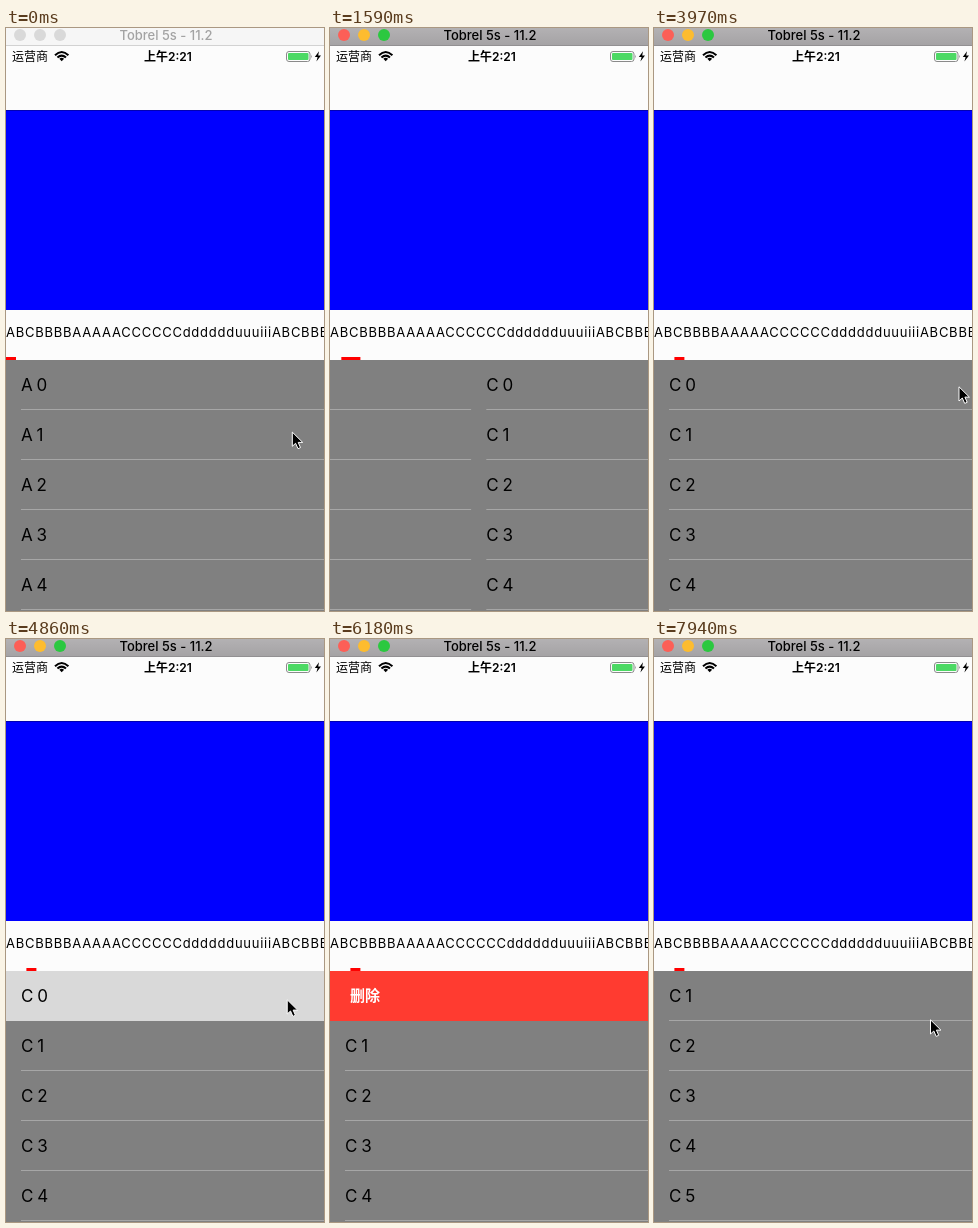
An HTML page that plays this animation: 318 by 583 pixels, repeating every 8 s.

```html
<!DOCTYPE html>
<html lang="zh">
<head>
<meta charset="utf-8">
<title>Paged list</title>
<style>
  html, body { margin: 0; width: 100%; height: 100%; overflow: hidden; background: #fcfcfc; }
  svg { display: block; width: 318px; height: 583px; }
  text { font-family: Inter, "Noto Sans CJK SC", "Noto Sans CJK", sans-serif; white-space: pre; }
  .title { font-size: 13px; font-weight: 500; text-anchor: middle; }
  .status { font-size: 12px; font-weight: 500; }
  .row { font-size: 17px; letter-spacing: -.5px; }
  .tabs { font-size: 13px; letter-spacing: .75px; }
  .del { font-size: 15px; font-weight: 600; fill: #fff; text-anchor: middle; }
</style>
</head>
<body>
<svg viewBox="0 0 318 583" xmlns="http://www.w3.org/2000/svg">
  <defs>
    <linearGradient id="metal" x2="0" y2="1">
      <stop stop-color="#b3b1b3"/><stop offset="1" stop-color="#a5a3a5"/>
    </linearGradient>
  </defs>
  <rect width="318" height="583" fill="#fcfcfc"/>

  <rect id="bar" width="318" height="17"/>
  <rect id="edge" y="17" width="318" height="1"/>
  <g id="lights">
    <circle cx="14" cy="7" r="6"/><circle cx="34" cy="7" r="6"/><circle cx="54" cy="7" r="6"/>
  </g>
  <text id="title" class="title" x="160" y="12">Tobrel 5s - 11.2</text>

  <text class="status" x="6" y="32.5">运营商</text>
  <g fill="none" stroke="#000" stroke-width="2">
    <path d="M49 27.2Q55.7 20.8 62.4 27.2"/>
    <path d="M51.4 29.6Q55.7 25.6 60 29.6"/>
    <path d="M53.3 30.8Q55.7 28.8 58.1 30.8L55.7 33.2Z" fill="#000" stroke="none"/>
  </g>
  <text class="status" x="162" y="32.5" text-anchor="middle" style="font-weight:600">上午2:21</text>
  <rect x="280.5" y="23.5" width="23.5" height="10" rx="2.5" fill="none" stroke="#8a8a8a"/>
  <rect x="282" y="25" width="20.5" height="7" rx="1" fill="#4cd964"/>
  <path d="M305 26.8q1.6 1.7 0 3.4z" fill="#8a8a8a"/>
  <path d="M313 23.3L308.8 29H311.6L310.4 33.4L315 27.4H312.2Z"/>

  <rect y="82" width="318" height="200" fill="#00f"/>
  <rect y="82" width="318" height="1" fill="#000" opacity=".3"/>
  <text class="tabs" x="0" y="309">ABCBBBBAAAAACCCCCCdddddduuuiiiABCBBBBAAAAA</text>
  <rect id="mark" y="329" height="3" fill="#f00"/>

  <rect y="332" width="318" height="251" fill="#808080"/>
  <g id="lists"></g>
  <path id="cursor" d="M0 .8V15L3.3 12L5.7 17.4L8.2 16.3L5.9 11.1H10.4Z" stroke="#fff"/>
</svg>

<script>
const LOOP = 8000, FIRST = 260, STEP = 88.3;
const W = 318, TOP = 332, ROW = 50;
const $ = id => document.getElementById(id);

function set(el, attrs) {
  for (const k in attrs) el.setAttribute(k, attrs[k]);
}
function add(parent, tag, attrs, text = "") {
  const el = document.createElementNS("http://www.w3.org/2000/svg", tag);
  set(el, attrs);
  el.textContent = text;
  return parent.appendChild(el);
}

const ramp = (t, from, dur) => Math.min(1, Math.max(0, (t - from) / dur));
const easeOut = u => 1 - (1 - u) ** 3;

// The screen refreshes in even steps
const stepTime = t => t < FIRST ? 0 : FIRST + Math.floor((t - FIRST) / STEP) * STEP;

// Pointer moves: start, duration, goal
const moves = [
  [350, 270, -20, 410], [800, 340, 208, 416],
  [1410, 170, -20, 408], [1940, 350, 247, 391],
  [2290, 620, 297, 358], [3080, 270, 305, 358],
  [3970, 890, 281, 360], [4860, 875, 163.5, 366],
  [5735, 270, -20, 283], [6900, 520, 255, 358], [7510, 330, 276.5, 380]
];
function pointer(t) {
  let x = 286.3, y = 403.3;
  for (const [from, dur, toX, toY] of moves) {
    const u = ramp(t, from, dur);
    x += (toX - x) * u;
    y += (toY - y) * u;
  }
  return [x, y];
}

function addRow(parent, name, i) {
  const y = TOP + i * ROW;
  const line = add(parent, "rect", { x: 15, y: y + 49, width: W, height: 1, fill: "#a6a6a6" });
  const label = add(parent, "text", { class: "row", x: 15, y: y + 31 }, name + " " + i);
  return { line, label };
}
function addRows(parent, name, from) {
  for (let i = from; i < from + 6; i++) addRow(parent, name, i);
}

// Each page is clipped by the next one's background
const pages = ["A", "B", "C"].map(() => {
  const page = add($("lists"), "g", {});
  add(page, "rect", { y: TOP, width: W, height: 300, fill: "#808080" });
  return page;
});
addRows(pages[0], "A", 0);
addRows(pages[1], "B", 0);
const back = add(pages[2], "rect", { y: TOP, width: W, height: ROW });
const first = addRow(pages[2], "C", 0);
const del = add(pages[2], "rect", { y: TOP, height: ROW, fill: "#ff3b30" });
const delText = add(pages[2], "text", { class: "del", y: 362 }, "删除");
const rest = add(pages[2], "g", {});
add(rest, "rect", { y: TOP + ROW, width: W, height: 320, fill: "#808080" });
addRows(rest, "C", 1);

function drawWindow(active) {
  set($("bar"), { fill: active ? "url(#metal)" : "#f6f6f6" });
  set($("edge"), { fill: active ? "#929092" : "#d2d2d2" });
  set($("title"), { fill: active ? "#000" : "#a3a3a3" });
  const colors = ["#fc5f57", "#fdbc2f", "#2bc840"];
  [...$("lights").children].forEach((c, i) => set(c, { fill: active ? colors[i] : "#d9d9d9" }));
}

function drawPages(t) {
  const pos = easeOut(ramp(t, 400, 610)) + easeOut(ramp(t, 1440, 610));
  pages.forEach((p, i) => set(p, { transform: `translate(${(i - pos) * W})` }));
  // The right end of the mark leads, the left end follows
  const base = Math.floor(pos), f = pos - base, pitch = 10.2;
  const left = (base + Math.max(0, f * 2 - 1)) * pitch;
  const right = (base + Math.min(1, f * 2)) * pitch + 10;
  set($("mark"), { x: left, width: right - left });
}

function drawFirstRow(t) {
  const open = 105 * ramp(t, 4960, 775) + (W - 105) * ramp(t, 5735, 275);
  const gone = ROW * easeOut(ramp(t, 6270, 455));
  const pressed = t >= 4600 && t < 4960;
  const slide = W - open + 35;
  set(back, { fill: pressed ? "#d9d9d9" : "#808080" });
  set(first.line, { x: open ? 0 : 15, opacity: pressed ? 0 : 1 });
  set(first.label, { x: 15 - open });
  set(del, { x: W - open, width: open });
  set(delText, { x: open > 200 ? slide : Math.max(W - 35, slide) });
  set(rest, { transform: `translate(0 ${-gone})` });
}

function draw(t) {
  drawWindow(t >= FIRST);
  drawPages(t);
  drawFirstRow(t);
  set($("cursor"), { transform: `translate(${pointer(t)})` });
}

const start = performance.now();
function tick() {
  draw(stepTime((performance.now() - start) % LOOP));
  requestAnimationFrame(tick);
}
tick();
</script>
</body>
</html>
```
